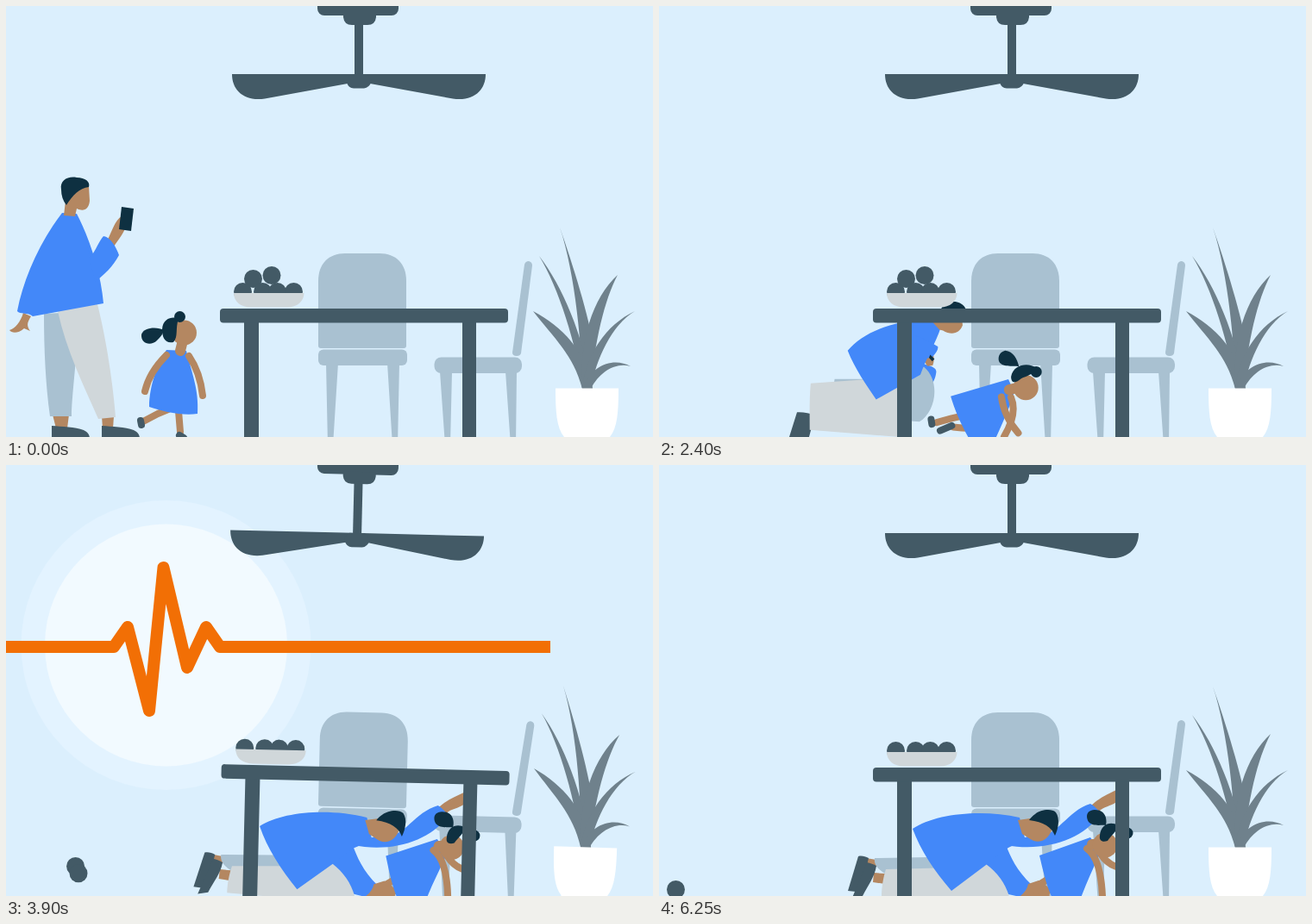
Write an HTML page that moves like this. It is 750 px wide and 500 px high and loops after 6.45 s.

```html
<!DOCTYPE html>
<html lang="en">
<head>
<meta charset="utf-8">
<title>Earthquake safety</title>
<style>
html, body { margin: 0; width: 100%; height: 100%; overflow: hidden; background: #dbeffd; }
svg { display: block; width: 100%; height: 100%; }
</style>
</head>
<body>
<svg viewBox="0 0 750 500">
  <defs><clipPath id="wipe"><rect id="wipeBox" y="0" height="500"/></clipPath></defs>
  <g id="halo">
    <circle cx="185.5" cy="209" r="168" fill="#e3f3ff"/>
    <circle cx="185.5" cy="209" r="140.5" fill="#f2faff"/>
  </g>
  <g id="fan" fill="#435a66">
    <rect x="361" y="-20" width="94" height="31" rx="8"/>
    <path d="M391 8H429V13Q428 22 419 22H401Q392 22 391 13Z"/>
    <path d="M404 20H414V80H404Z"/>
    <path d="M262 79H404V88L396 90L300 107.500C275 111 262 97 262 79ZM556 79H414V88L422 90L518 107.500C543 111 556 97 556 79Z"/>
    <path d="M395 84L400 79H418L424 87Q421 95 415 95.500H403Q397 95 395 89Z"/>
  </g>
  <g id="armchair" fill="#a9c1d1">
    <path d="M362 319C362 299 374 287 393 287H433C452 287 464 299 464 319V394Q464 397 461 397H365Q362 397 362 394Z"/>
    <rect x="362" y="398.500" width="103" height="18.500" rx="6"/>
    <path d="M371 414H385L379 510H373ZM442 414H456L454 510H448Z"/>
  </g>
  <g id="chair" fill="#a9c1d1">
    <path d="M601 300Q602 296 606 296Q610 297 610 301L597 403Q596 406 592 406Q587 406 587 402Z"/>
    <rect x="496.500" y="407.500" width="101.500" height="18.500" rx="8"/>
    <path d="M503 424H517L515 510H509ZM579 424H592L591 510H585Z"/>
  </g>
  <g id="plant">
    <g id="leaves" fill="#6f818c"></g>
    <path fill="#fff" d="M637 443.500H710C710 470 709 489 700 500V515H647V500C638 489 637 470 637 443.500Z"/>
  </g>
  <path id="alert" fill="#df2c22" fill-rule="evenodd" d="M178.500 151L210 230L126 217.500ZM176.500 167L141 211L198 220.500ZM170 181L178 182.500L175.500 197.500L168 196.500ZM166.500 204L174.500 205.500L173 213.500L165 212Z"/>
  <g id="people"></g>
  <g id="spill" fill="#435a66"><circle r="10.500"/><circle r="10.500"/></g>
  <g id="table" fill="#435a66">
    <circle cx="274.500" cy="331.500" r="10.500"/><circle cx="297.500" cy="331.500" r="10.500"/>
    <circle cx="314.500" cy="331.500" r="10.500"/><circle cx="333.500" cy="331.500" r="10.500"/>
    <path fill="#d0d7da" d="M264 333H345.500C345.500 343 337 349.500 326 349.500H284C272 349.500 264 343 264 333Z"/>
    <path d="M276 360H293V510H276ZM529 360H545V510H529Z"/>
    <rect x="248" y="351" width="334" height="16.500" rx="4"/>
  </g>
  <path id="pulse" clip-path="url(#wipe)" fill="none" stroke="#f26f05" stroke-width="14" stroke-linejoin="round"
    d="M-10 211H125L141 188L166 285L182.500 119L210 235L232 188L248 211H760"/>
</svg>
<script>
const LOOP = 6450, STEP = 50;
const SKIN = '#b48761', BLUE = '#4388f9', DARK = '#435a66', HAIR = '#0e3041', PALE = '#d0d7da', GREY = '#a9c1d1';
const $ = id => document.getElementById(id);
const clamp = v => Math.max(0, Math.min(1, v));
const ramp = (t, a, b) => clamp((t - a) / (b - a));

function add(parent, attrs) {
  const el = document.createElementNS('http://www.w3.org/2000/svg', 'path');
  for (const k in attrs) el.setAttribute(k, attrs[k]);
  return parent.appendChild(el);
}

for (const d of [
  'M642 257C657 300 676 360 682 400L678 444H668C668 400 660 310 642 257',
  'M618 290C645 325 668 380 680 444H668C662 395 640 325 618 290',
  'M611 354C645 372 672 400 680 444H668C658 405 635 385 611 354',
  'M709 312C694 340 682 390 678 444H668C664 390 680 338 709 312',
  'M729 354C702 370 684 410 678 444H668C672 405 695 370 729 354',
  'M724 418C706 413 688 425 678 444H668C680 414 706 408 724 418'
]) add($('leaves'), { d });

// A part is [colour, stroke width (0 = filled), one path per pose]; '' repeats the pose before.
// A key is [time, pose, x offset].
function actor(parts, keys) {
  const g = document.createElementNS('http://www.w3.org/2000/svg', 'g');
  $('people').append(g);
  const rig = parts.map(([color, width, ...poses]) => {
    const el = add(g, width
      ? { fill: 'none', stroke: color, 'stroke-width': width, 'stroke-linecap': 'round', 'stroke-linejoin': 'round' }
      : { fill: color });
    let last;
    const nums = poses.map(p => last = p ? p.match(/-?[\d.]+/g).map(Number) : last);
    return { el, nums, shape: poses[0] };
  });
  return t => {
    let i = keys.length - 1;
    while (i && keys[i][0] > t) i--;
    const a = keys[i], b = keys[i + 1] || a;
    const k = a === b ? 0 : ramp(t, a[0], b[0]);
    for (const { el, nums, shape } of rig) {
      const from = nums[a[1]], to = nums[b[1]];
      let n = 0;
      el.setAttribute('d', shape.replace(/-?[\d.]+/g, () => {
        const v = from[n] + (to[n] - from[n]) * k;
        n++;
        return v.toFixed(2);
      }));
    }
    g.setAttribute('transform', `translate(${a[2] + (b[2] - a[2]) * k} 0)`);
  };
}

// Poses: phone up, phone down, step, crawl, shelter
const man = actor([
  [BLUE, 0, 'M40 300L60 290C65 300 70 310 70 320C68 330 65 340 60 340L50 345L35 340Z', '', '',
    'M350 485L372 455C385 463 413 458 413 466C412 480 402 490 386 491L372 505L355 502Z',
    'M375 450L402 441C408 455 414 470 432 487C428 491 425 495 423 502L405 498L380 466Z'],
  [SKIN, 0, 'M20 356L29 360C24 368 24 371 28 377L21 374C14 380 7 380 4 376C11 374 17 366 20 356Z', '', '',
    'M375 490L392 492C395 498 396 500 398 506L390 508C385 508 378 508 372 508C372 500 373 495 375 490Z',
    'M428 486L440 482C450 488 455 490 452 502L444 504C436 504 426 504 419 500C424 496 427 491 428 486Z'],
  [SKIN, 0, 'M54 474L73 474L71 490L58 490Z', '', 'M63 474L84 474L80 490L66 490Z',
    'M245 464L254 465L252 473L243 472Z', 'M240 456L252 458L256 466L241 464Z'],
  [SKIN, 0, 'M111 476L125 476L124 490L112 490Z', '', 'M63 474L82 474L78 490L64 490Z',
    'M204 474L217 475L215 487L201 484Z', 'M249 473L262 474L262 486L248 484Z'],
  [DARK, 0, 'M53 487C65 488 80 488 90 492C96 495 97 498 97 503L53 503Z', '',
    'M62 487C74 488 89 488 99 492C105 495 106 498 106 503L62 503Z',
    'M233 460C238 459 243 460 247 462C246 466 244 470 241 473L222 472Z',
    'M231 454C235 453 239 454 243 456C240 470 234 485 228 495L219 494Z'],
  [DARK, 0, 'M111 487C123 488 138 488 148 492C154 495 155 498 155 503L111 503Z', '',
    'M55 487C67 488 82 488 92 492C98 495 99 498 99 503L55 503Z',
    'M193 465C198 464 203 466 207 468C203 480 197 490 194 503L180 500Z',
    'M241 461C245 462 249 463 252 465C250 478 242 488 236 500L224 502Z'],
  [GREY, 0, 'M44 357L83 355C84 400 76 450 76 476L51 476C46 440 44 400 44 357Z', '',
    'M60 355L102 347C103 400 89 440 84 478L66 476C60 440 60 400 60 355Z',
    'M300 464L380 447C408 450 404 484 380 484L250 474C248 470 249 466 252 464Z',
    'M312 455L330 460C340 465 335 472 325 474L262 474C252 468 249 462 250 456Z'],
  [PALE, 0, 'M60 354L106 346C117 390 124 440 127 477L107 479C90 440 70 400 60 354Z', '',
    'M53 357L100 348C100 390 92 440 84 478L59 474C56 430 53 390 53 357Z',
    'M300 464L340 455C360 480 366 490 364 510L212 499C213 488 214 478 216 470Z',
    'M345 467L379 463C395 475 405 490 408 510L258 500C258 490 260 478 263 469Z'],
  [SKIN, 0, 'M117 273L125 279C131 270 136 264 139 256L134 244C127 248 124 258 117 273Z',
    'M103 345L114 343C118 350 124 356 131 362L121 368C114 362 108 354 103 345Z',
    'M98 345L105 343C106 352 109 362 113 372L104 375C101 366 99 356 98 345Z',
    'M380 420L390 420C395 425 395 430 390 435L385 435C380 430 378 425 380 420Z',
    'M500 396L510 402C515 396 524 396 530 391L530 377C520 382 510 386 500 396Z'],
  [BLUE, 0, 'M65 240L82 241C96 268 110 308 113 345L31 360C26 355 16 358 13 354C20 318 38 275 65 240Z', '', '',
    'M409 411L416 424C402 440 380 450 370 461L331 495C318 475 302 445 292 418C315 402 355 401 409 411Z',
    'M418 409L426 440C405 438 398 450 379 464L339 494C320 472 303 447 294 422C320 404 375 399 418 409Z'],
  [BLUE, 0, 'M94 278L98 291C104 284 108 272 113 267C121 268 128 280 131 289C124 302 114 312 103 320Z',
    'M95 290L98 300C104 315 108 325 110 330C115 333 117 335 117 338C114 344 108 346 100 347Z',
    'M95 290L98 300C104 315 108 325 109 330C111 335 112 340 112 345C108 346 104 347 98 347Z',
    'M370 420L380 420C390 420 395 420 400 421C400 425 395 428 390 432C380 435 375 435 372 430Z',
    'M402 440L430 430C460 438 470 402 500 393C504 395 509 400 512 404C495 432 450 450 402 441Z'],
  [SKIN, 0, 'M96 209L97 226C96 236 90 239 82 235L80 244L67 243L69 226C76 216 84 211 96 209Z', '', '',
    'M443 415L445 428C441 437 430 440 419 433L414 428L408 416L420 410C430 408 438 412 443 415Z',
    'M452 412L455 424C450 437 438 440 429 433L421 428L416 412L430 410C440 408 447 408 452 412Z'],
  [HAIR, 0, 'M64 213C62 202 72 197 82 199C92 199 98 204 96 210C85 211 77 220 70 231C66 226 64 220 64 213Z', '', '',
    'M424 405C432 399 442 399 447 403C454 408 454 420 449 430C445 420 436 414 419 413C420 409 422 407 424 405Z',
    'M436 405C442 400 455 398 460 403C465 410 463 422 459 430C455 420 446 414 429 412C431 409 433 407 436 405Z'],
  [HAIR, 0, 'M134 233L148 235L145 261L131 259Z', 'M142 371L137 383L113 371L118 359Z',
    'M120 383L111 393L98 378L103 366Z', 'M390 420L390 420L390 420L390 420Z', '']
], [[0, 0, 0], [1250, 0, 0], [1500, 1, 0], [1600, 1, 0], [2050, 2, 112], [2150, 2, 125],
  [2500, 3, -41], [2850, 3, 0], [3100, 4, 0]]);

// Poses: walk, duck, crawl, shelter
const girl = actor([
  [SKIN, 8, 'M188 468L176 473L159 482', 'M250 476L238 480L220 487', 'M445 475L430 478L413 482', 'M455 478L442 486L428 497'],
  [SKIN, 8, 'M200 470L201 482L202 494', 'M258 490L240 488L226 490', 'M455 490L445 490L436 488', 'M462 490L450 494L440 502'],
  [DARK, 8, 'M156 481L157 486', 'M212 485L216 489', 'M407 478L407 484', 'M458 472L460 474'],
  [DARK, 8, 'M201 498L206 501', 'M214 488L218 490', 'M420 494L436 486', 'M460 480L462 482'],
  [BLUE, 0, 'M186 399L209 400C215 425 224 445 222 473C205 476 180 470 166 465C166 440 176 415 186 399Z',
    'M300 433L306 449C298 470 288 490 278 508C270 510 262 508 256 508C245 492 236 472 230 452C250 440 275 437 300 433Z',
    'M497 433L504 447C500 465 490 485 482 505C475 507 465 507 455 507C445 490 436 470 431 453C450 443 475 439 497 433Z',
    'M500 432L512 448C505 465 495 485 488 505C480 507 470 507 458 507C450 492 445 470 441 453C460 440 480 437 500 432Z'],
  [SKIN, 8, 'M186 405Q166 425 161 447', 'M302 441Q309 470 306 500', 'M486 457Q488 478 510 494', 'M496 445Q512 456 514 500'],
  [SKIN, 8, 'M212 406Q225 425 228 452', 'M303 450Q311 475 309 498', 'M500 455Q508 472 488 500', 'M510 448Q518 462 530 466'],
  [SKIN, 12, 'M202 400L205 388', 'M300 442L312 440', 'M498 446L510 443', 'M502 440L512 440'],
  [SKIN, 29, 'M206.5 379h0', 'M321 442h0', 'M517 443h0', 'M517 441h0'],
  [HAIR, 0, 'M181 375C182 360 196 360 200 363C196 374 200 384 194 390C184 392 181 384 181 375Z',
    'M300 430C303 415 320 412 330 420C328 428 318 428 312 432C306 438 300 438 300 430Z',
    'M501 430C504 415 522 414 530 420C526 428 518 430 513 432C506 438 501 438 501 430Z',
    'M511 430C512 416 524 413 532 418C530 426 524 430 520 436C514 438 510 436 511 430Z'],
  [HAIR, 0, 'M183 376C176 372 160 372 157 381C156 392 168 395 175 388C179 384 181 382 183 376Z',
    'M310 416C307 406 302 400 294 399C288 406 290 416 294 418C302 420 306 418 310 416Z',
    'M510 419C508 410 504 401 494 400C486 400 483 408 486 413C492 420 502 416 510 419Z',
    'M518 418C520 408 516 400 505 400C496 400 494 408 498 414C504 420 512 417 518 418Z'],
  [HAIR, 13, 'M201.5 360.5h0', 'M333 426h0', 'M529 424h0', 'M543 427h0']
], [[0, 0, 0], [1550, 0, 0], [1850, 0, 39], [2050, 1, 0], [2500, 2, -62], [2850, 2, 0], [3100, 3, 0]]);

// Start time, landing time, bounce height and the x, y and resting x of each rolling ball
const balls = [[3300, 3700, 27, 286.5, 316.5, 19.5], [3460, 3800, 25, 308, 312.5, -16]];
const FLOOR = 492.5;

function roll(el, t, [start, land, hop, x0, y0, x1]) {
  const left = 1 - ramp(t, start, 4450);
  const fall = ramp(t, start, land), u = ramp(t, land, land + 400);
  el.setAttribute('cx', x1 + (x0 - x1) * left * left);
  el.setAttribute('cy', y0 + (FLOOR - y0) * fall * fall - 4 * hop * u * (1 - u));
}

function shake(t) {
  const shaking = t > 2983 && t < 4650;
  const s = shaking ? -Math.sin((t - 2983) / 333 * 2 * Math.PI) : 0;
  const tilt = (id, deg, x, y) => $(id).setAttribute('transform', `rotate(${s * deg} ${x} ${y})`);
  tilt('fan', 1.37, 409, 0);
  tilt('armchair', 1.37, 413, 394);
  tilt('chair', 1.37, 553, 398);
  tilt('plant', 1.75, 674, 385);
  tilt('table', 1.37, 415, 425);
  tilt('people', 1.37, 415, 425);
}

function draw(t) {
  $('alert').style.display = t >= 800 && t < 2300 ? '' : 'none';
  man(t);
  girl(t);
  shake(t);
  balls.forEach((ball, i) => roll($('spill').children[i], t, ball));
  $('halo').setAttribute('opacity', ramp(t, 3200, 3500) - ramp(t, 5500, 5800));
  const head = 750 * ramp(t, 3269, 4019), tail = 750 * ramp(t, 5504, 6250);
  $('wipeBox').setAttribute('x', tail);
  $('wipeBox').setAttribute('width', Math.max(0, head - tail));
}

const begin = performance.now();
function tick() {
  const t = (performance.now() - begin) % LOOP;
  draw(Math.floor(t / STEP) * STEP);
  requestAnimationFrame(tick);
}
tick();
</script>
</body>
</html>
```
